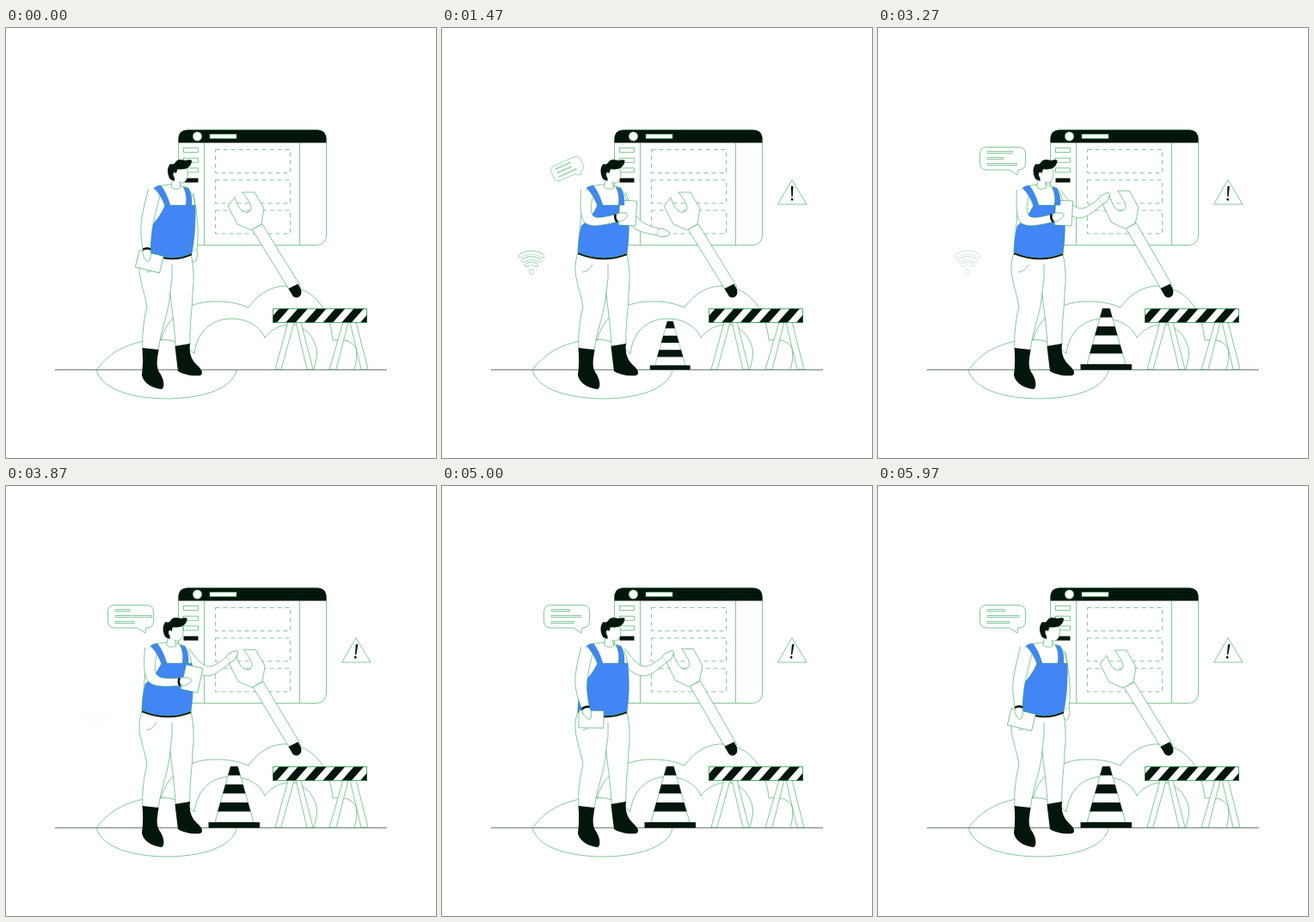
An HTML page for the animation above (6000 ms loop, 500 by 500 pixels).

```html
<!DOCTYPE html>
<html lang="en">
<head>
<meta charset="utf-8">
<title>Under maintenance</title>
<style>
html, body { margin: 0; width: 100%; height: 100%; overflow: hidden; background: #fff; }
svg { display: block; width: 100vw; height: 100vh; }
.line { fill: none; stroke: #2fa455; stroke-width: .6; }
.paper { fill: #fff; stroke: #2fa455; stroke-width: .6; }
.ink { fill: #03160b; }
.blue { fill: #4285f4; stroke: #2fa455; stroke-width: .4; }
.bar { stroke: #03160b; fill: none; }
</style>
</head>
<body>
<svg viewBox="0 0 500 500">
  <defs><clipPath id="board"><rect x="310" y="326" width="110" height="16.5"/></clipPath></defs>

  <g id="hills" class="line">
    <path d="M180 364C186 338 208 319 240 318Q264 317 282 325C294 308 310 300 325 300C352 301 376 320 380 363Q400 360 407 372Q409 386 405 397"/>
    <path d="M219 379C222 352 240 338 262 338C282 338 296 348 301 360C312 346 326 344 336 345C354 350 364 370 361 384L358 397"/>
    <path d="M219 379Q205 362 178 362C138 364 116 382 105 398C112 420 145 431 190 431C235 430 264 417 268 398"/>
  </g>
  <path d="M57 397.5H443" stroke="#5f7467" stroke-width=".9"/>

  <g id="browser">
    <rect class="paper" x="200.5" y="118.5" width="172" height="134" rx="11"/>
    <path class="ink" d="M200.5 133.5V129.5Q200.5 118.5 211.5 118.5H361.5Q372.5 118.5 372.5 129.5V133.5Z"/>
    <circle class="paper" cx="222.5" cy="126" r="5.3"/>
    <rect class="paper" x="237" y="123.3" width="31" height="5.4"/>
    <path class="line" d="M230.5 133V252M341.5 133V252"/>
    <g id="cards" class="line" stroke-dasharray="5 4"></g>
    <g id="menu"></g>
  </g>

  <g id="barricade">
    <path class="paper" d="M328 342L313 397H320L335 342ZM337 342L350 397H357L343 342ZM392 342L376 397H384L398 342ZM400 342L413 397H421L407 342Z"/>
    <rect class="paper" x="310.5" y="326.5" width="109" height="16"/>
    <path id="stripes" class="ink" clip-path="url(#board)"/>
    <rect class="line" x="310.5" y="326.5" width="109" height="16"/>
  </g>

  <g id="cone">
    <path class="paper" d="M261 326.5H269.5L288 391H243Z"/>
    <path id="rings" class="ink"/>
    <rect class="ink" x="235.5" y="391" width="59.5" height="6.5"/>
  </g>

  <g id="wrench">
    <path class="paper" d="M286 234L298 228L343 301L331 307Z"/>
    <path class="paper" d="M258 207L266 197Q269 208 275 213Q282 217 285 210Q286 205 275 191L289 191L300 210L297 228L285 235L269 228Z"/>
    <path class="ink" d="M328.5 303L339.500 297.500L343 304Q345 311 339 313.500Q334 314 332 309Z"/>
  </g>

  <g id="wifi"></g>

  <g id="warning">
    <path class="paper" d="M407 176.5L424 205H390.500Z"/>
    <g id="mark" class="ink">
      <path d="M405.8 184H408.400L407.800 196H406.400Z"/>
      <circle cx="407.1" cy="199.3" r="1.4"/>
    </g>
  </g>

  <g id="bubble">
    <path class="paper" d="M126.500 138.500H163.500Q171.500 138.500 171.500 146.500V157Q171.500 165 163 165L162 171L153 165H126.500Q118.500 165 118.500 157V146.500Q118.500 138.500 126.500 138.500Z"/>
    <g id="text"></g>
  </g>

  <path id="farArm" class="paper"/>
  <path id="farHand" class="paper"/>

  <g id="legs">
    <path class="paper" d="M190 300C193 330 196 345 197 370L214 368C213 345 217 325 217 308Q220 285 215 262L180 262"/>
    <path class="paper" d="M158 262C150 285 160 300 164 324C160 340 158 356 159 373L177 375C180 350 190 330 191 306Q194 292 193 275"/>
    <path id="pocket" class="line" d="M163 284Q171 283 175 275"/>
    <path class="ink" d="M158.500 372L177.500 374C176 385 174 392 178 400C184 408 185 418 181 420C172 419 160 414 158 404Q160 388 158.500 372Z"/>
    <path class="ink" d="M196.500 370L214 367C213 376 214 384 222 392C228 397 230 402 226 404C216 405 206 403 200 399Q198 384 196.500 370Z"/>
  </g>

  <path class="twist paper" d="M186 182Q176 183 170 185Q163 190 163 205Q160 235 158 261Q188 273 215 262Q218 235 216 207Q213 188 205 185Q199 184 196 182Z"/>
  <path class="twist bar" stroke-width="2" d="M158 262Q188 274 215 263"/>
  <path class="twist blue" d="M181 206L216 206C218 225 218 245 215 262Q188 273 158 261Q158 245 162 230Q173 222 181 206Z"/>

  <g id="head">
    <path class="paper" d="M195 166L210 163C213 170 211 178 206 180Q203 181 202 179L203 186Q197 189 192 185L194 174Z"/>
    <path class="ink" d="M191 176C187 170 187 162 191 158C194 159 196 158 197 156C201 151 206 154 209 154C212 153 215 153 216 154C216 160 211 164 206 164C202 165 200 163 199 165L198 169C194 165 193 171 196 174L196 178Z"/>
  </g>

  <rect id="sheet" class="paper" x="-14.5" y="-10" width="29" height="20"/>
  <path id="nearArm" class="paper"/>
  <path id="nearHand" class="paper"/>
  <path id="watch" class="bar" stroke-width="2.6" d="M0-4.5Q-2.500 0 0 4.500"/>
  <path class="twist blue" d="M168 186Q172 183 176 183Q183 192 187 206L181 208Q177 195 168 186ZM202 185L208 186Q213 195 212 206L205 206Q207 193 202 185Z"/>
</svg>
<script>
const LOOP = 6000;
const $ = id => document.getElementById(id);
const set = (el, attrs) => { for (const k in attrs) el.setAttribute(k, attrs[k]); return el; };
const add = (parent, tag, attrs) =>
  parent.appendChild(set(document.createElementNS('http://www.w3.org/2000/svg', tag), attrs));
const move = (id, transform) => $(id).setAttribute('transform', transform);

const clamp = u => Math.max(0, Math.min(1, u));
const ramp = (t, from, to) => clamp((t - from) / (to - from));
const smooth = u => u * u * (3 - 2 * u);
const easeOut = u => 1 - (1 - u) * (1 - u);
const lerp = (a, b, u) => a + (b - a) * u;
const lerp2 = (a, b, u) => [lerp(a[0], b[0], u), lerp(a[1], b[1], u)];
const pt = p => p[0].toFixed(2) + ' ' + p[1].toFixed(2);

// Eases from 0 to 1 over [a, b], then back to 0 over [c, d].
const pulse = (t, a, b, c, d) => smooth(ramp(t, a, b)) - smooth(ramp(t, c, d));

const polar = (p, angle, r) => {
  const a = angle * Math.PI / 180;
  return [p[0] + r * Math.cos(a), p[1] + r * Math.sin(a)];
};
const about = (x, y, scale, angle = 0) =>
  `translate(${x} ${y}) rotate(${angle}) scale(${scale}) translate(${-x} ${-y})`;

// Turning the body shifts the chest and draws in the left of the waist.
const twistPath = (d, turn) => d.replace(/([\d.]+) ([\d.]+)/g, (_, x, y) => {
  const drop = clamp((y - 206) / 56), left = (215 - x) / 57;
  return pt([+x + turn * lerp(4, 1 + 9 * left, drop), +y]);
});

// Two bones with angles in degrees; returns the wrist.
function drawArm(name, shoulder, upper, fore, widths) {
  const elbow = polar(shoulder, upper.angle, upper.length);
  const wrist = polar(elbow, fore.angle, fore.length);
  const bend = (upper.angle + fore.angle) / 2;
  const edge = side => [
    polar(shoulder, upper.angle + side, widths[0]),
    polar(elbow, bend + side, widths[1]),
    polar(wrist, fore.angle + side, widths[2])
  ];
  const curve = (a, m, b) => `C${pt(lerp2(a, m, .9))} ${pt(lerp2(b, m, .9))} ${pt(b)}`;
  const [a, b, c] = edge(90), [x, y, z] = edge(-90);
  $(name + 'Arm').setAttribute('d', `M${pt(a)}${curve(a, b, c)}L${pt(z)}${curve(z, y, x)}`);
  move(name + 'Hand', `translate(${pt(wrist)}) rotate(${fore.angle})`);
  return wrist;
}

// Static repeats
for (let i = 0; i < 3; i++)
  add($('cards'), 'rect', { x: 243.5, y: 141.5 + 35.3 * i, width: 87, height: 27 });

const menu = [0, 1, 2, 3].map(i =>
  add($('menu'), 'rect', { x: 206.5, y: 139.5 + 11.7 * i, width: 17, height: 5, class: i === 3 ? 'ink' : 'paper' }));

let stripes = '';
for (let x = 303; x < 420; x += 21.7) stripes += `M${x} 343h11.5l15-17h-11.5Z`;
$('stripes').setAttribute('d', stripes);

const conePoint = (y, side) => `${265.3 + side * (4.2 + (y - 326) * .285)} ${y}`;
let rings = '';
for (let y = 326; y < 380; y += 21)
  rings += `M${conePoint(y, -1)}L${conePoint(y, 1)}L${conePoint(y + 10.5, 1)}L${conePoint(y + 10.5, -1)}Z`;
$('rings').setAttribute('d', rings);

for (let r = 23; r > 5; r -= 6.5) {
  const x = r * .57, y = 284 - r * .82;
  const d = `M${104 - x} ${y}A${r} ${r} 0 0 1 ${104 + x} ${y}`;
  for (const [stroke, width] of [['#2fa455', 4.4], ['#fff', 3.2]])
    add($('wifi'), 'path', { d, fill: 'none', stroke, 'stroke-width': width, 'stroke-linecap': 'round' });
}
add($('wifi'), 'circle', { cx: 104, cy: 283.5, r: 2.8, class: 'paper' });

const rows = [0, 1, 2].map(i =>
  add($('text'), 'rect', { x: 127, y: 143.7 + 7 * i, height: 1.6, class: 'paper' }));

for (const id of ['nearHand', 'farHand'])
  $(id).setAttribute('d', 'M0-4Q5-6 9-4L13-2.5Q15.500-.500 12.500 1.500L9 3.500Q5 6 0 4');

const twisted = [...document.querySelectorAll('.twist')].map(el => ({ el, d: el.getAttribute('d') }));

function drawWorker(t) {
  const turn = 1 - pulse(t, 200, 1300, 5000, 6000);
  const hold = pulse(t, 200, 1300, 3500, 5440);
  const raise = pulse(t, 400, 2300, 5000, 6000);
  const lean = pulse(t, 1500, 2400, 3300, 4400);

  for (const { el, d } of twisted) el.setAttribute('d', twistPath(d, turn));
  move('head', `translate(${-3.5 * (1 - turn) - 4 * lean} 0)`);

  drawArm('far', [207 + 4 * turn, 193],
    { angle: lerp(80, 50, raise * raise), length: 40 },
    { angle: lerp(90, -40, raise), length: lerp(26, 34, raise) }, [7, 6.5, 4]);

  const fore = { angle: lerp(87, -14, hold), length: lerp(28, 40, hold) };
  const wrist = drawArm('near', [169 + 4 * turn, 189],
    { angle: lerp(105, 97, hold), length: 42 }, fore, [7.5, 7.5, 4.5]);
  move('watch', `translate(${pt(wrist)}) rotate(${fore.angle})`);
  move('sheet', `translate(${pt(polar(wrist, fore.angle - 10, 14.5))}) rotate(${fore.angle - 73})`);
}

function drawSigns(t) {
  const phase = t / 1000 * 2 * Math.PI;
  const cos = Math.cos(phase), sin = Math.sin(phase);

  const pull = t > 2500 ? Math.sin(Math.PI * (t - 2500) / 1750) ** 2 : 0;
  move('wrench', about(337, 306, 1, 1.8 * pull));

  const pop = easeOut(ramp(t, 1150, 1860));
  move('bubble', about(162, 171, pop, -80 * (1 - pop)));
  move('cone', about(265, 397, easeOut(ramp(t, 1040, 1840))));
  move('warning', about(407, 194, easeOut(ramp(t, 800, 1350))));
  move('mark', about(407, 192, 1, 4 * (1 + cos)));
  $('wifi').setAttribute('opacity', ((1 - cos) / 2) ** 2 * Math.min(1, .1 + t / 2600));

  const wave = 6 * sin - 2 * cos;
  rows.forEach((row, i) => row.setAttribute('width', i === 1 ? 31 - 2 * wave : 23.5 + 2.5 * i + wave));

  menu.forEach((item, i) => {
    const start = 5750 - 100 * i;
    item.setAttribute('opacity', 1 - ramp(t, 5000, 5200) + ramp(t, start, start + 170));
  });
}

const origin = performance.now();
function tick() {
  const t = (performance.now() - origin) % LOOP;
  drawWorker(t);
  drawSigns(t);
  requestAnimationFrame(tick);
}
tick();
</script>
</body>
</html>
```
